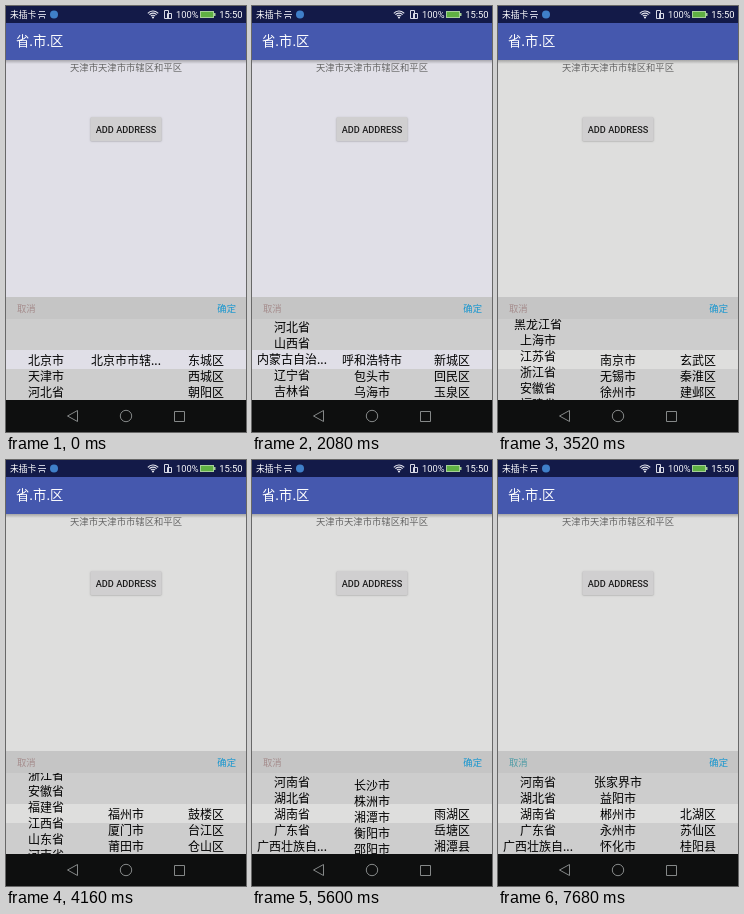
These frames come from a looping animation (240 px wide and 426 px high, 8.64 s). An HTML page with a canvas:

```html
<!DOCTYPE html>
<html lang="zh-CN">
<head>
<meta charset="utf-8">
<title>省市区</title>
<style>
html, body { margin: 0; width: 100%; height: 100%; overflow: hidden; background: #dedede; }
canvas { display: block; width: 240px; height: 426px; }
</style>
</head>
<body>
<canvas id="stage" width="240" height="426"></canvas>
<script>
const ctx = document.getElementById('stage').getContext('2d');
const LOOP = 8640, STEP = 160, ROW = 16.1, MID = 354.7;
const FONT = 'Roboto, "Noto Sans CJK SC", "Noto Sans CJK", sans-serif';

// province : cities : districts of the first city
const regions = `北京市:北京市市辖区:东城区 西城区 朝阳区
天津市:天津市市辖区:和平区 河东区 河西区
河北省:石家庄市 唐山市 秦皇岛市:长安区 桥西区 新华区
山西省:太原市 大同市 阳泉市:小店区 迎泽区 杏花岭区
内蒙古自治区:呼和浩特市 包头市 乌海市:新城区 回民区 玉泉区
辽宁省:沈阳市 大连市 鞍山市:和平区 沈河区 大东区
吉林省:长春市 吉林市 四平市:南关区 宽城区 朝阳区
黑龙江省:哈尔滨市 齐齐哈尔市 鸡西市:道里区 南岗区 道外区
上海市:上海市市辖区:黄浦区 徐汇区 长宁区
江苏省:南京市 无锡市 徐州市:玄武区 秦淮区 建邺区
浙江省:杭州市 宁波市 温州市:上城区 下城区 江干区
安徽省:合肥市 芜湖市 蚌埠市:瑶海区 庐阳区 蜀山区
福建省:福州市 厦门市 莆田市:鼓楼区 台江区 仓山区
江西省:南昌市 景德镇市 萍乡市:东湖区 西湖区 青云谱区
山东省:济南市 青岛市 淄博市:历下区 市中区 槐荫区
河南省:郑州市 开封市 洛阳市:中原区 二七区 管城回族区
湖北省:武汉市 黄石市 十堰市:江岸区 江汉区 硚口区
湖南省:长沙市 株洲市 湘潭市 衡阳市 邵阳市 岳阳市 常德市 张家界市 益阳市 郴州市 永州市 怀化市:芙蓉区 天心区 岳麓区
广东省:广州市 韶关市 深圳市:荔湾区 越秀区 海珠区
广西壮族自治区:南宁市 柳州市 桂林市:兴宁区 青秀区 江南区`
  .split('\n').map(line => line.split(':').map(part => part.split(' ')));
const provinces = regions.map(region => region[0][0]);

// districts of the later cities of 湖南省
const hunan = `荷塘区 芦淞区 石峰区:雨湖区 岳塘区 湘潭县:珠晖区 雁峰区 石鼓区:双清区 大祥区 北塔区:岳阳楼区 云溪区 君山区:武陵区 鼎城区 安乡县:永定区 武陵源区 慈利县:资阳区 赫山区 南县:北湖区 苏仙区 桂阳县`
  .split(':').map(part => part.split(' '));

// [time, wheel position in rows]
const provinceKeys = [[1440, 0], [1600, 2], [2240, 4.7], [2560, 5.9], [2720, 6.06], [2880, 6.06],
  [4160, 12.42], [4800, 16.2], [5120, 17]];
const cityKeys = [[5440, 0], [5600, 1.81], [6240, 4.5], [6560, 5], [6720, 5], [7360, 8.3], [7680, 9]];

function track(keys, t) {
  const next = keys.findIndex(key => key[0] > t);
  if (next === 0) return keys[0][1];
  if (next < 0) return keys[keys.length - 1][1];
  const [t0, a] = keys[next - 1], [t1, b] = keys[next];
  return a + (b - a) * (t - t0) / (t1 - t0);
}

function box(x, y, w, h, color) {
  ctx.fillStyle = color;
  ctx.fillRect(x, y, w, h);
}

// y is the middle of the glyphs
function label(text, x, y, size, color, align = 'left', weight = 400) {
  ctx.font = `${weight} ${size}px ${FONT}`;
  ctx.textAlign = align;
  ctx.fillStyle = color;
  ctx.fillText(text, x, y + size * 0.37);
}

function stroke(color, width, build) {
  ctx.strokeStyle = color;
  ctx.lineWidth = width;
  ctx.beginPath();
  build();
  ctx.stroke();
}

function disc(x, y, r, color) {
  ctx.fillStyle = color;
  ctx.beginPath();
  ctx.arc(x, y, r, 0, 7);
  ctx.fill();
}

function shade(y, h, alpha) {
  const fade = ctx.createLinearGradient(0, y, 0, y + h);
  fade.addColorStop(0, `rgba(0,0,0,${alpha})`);
  fade.addColorStop(1, 'rgba(0,0,0,0)');
  box(0, y, 240, h, fade);
}

function drawStatusBar() {
  box(0, 0, 240, 17, '#131a48');
  label('未插卡', 4, 9, 8.8, '#fff', 'left', 500);
  stroke('#c8cada', 1, () => {
    ctx.moveTo(33, 5.5); ctx.lineTo(39, 5.5);
    ctx.moveTo(32, 8.5); ctx.lineTo(40, 8.5);
    ctx.moveTo(33.5, 12.5); ctx.lineTo(33.5, 10.5); ctx.lineTo(38.5, 10.5); ctx.lineTo(38.5, 12.5);
  });
  disc(48, 8.5, 4, '#3f7fc8');
  stroke('#e4e5ee', 1.1, () => {
    for (const r of [2.8, 4.9, 7]) {
      ctx.moveTo(147 + r * Math.cos(-2.4), 12 + r * Math.sin(-2.4));
      ctx.arc(147, 12, r, -2.4, -0.74);
    }
  });
  disc(147, 11.5, 1.1, '#e4e5ee');
  stroke('#d8dae6', 1, () => {
    ctx.rect(158.5, 4.5, 4, 8);
    ctx.rect(161.5, 7.5, 4, 5);
  });
  label('100%', 170, 9, 9.3, '#f4f4f8');
  box(194, 5, 14, 7, '#a5cf98');
  box(195, 6, 12, 5, '#5fb043');
  box(208, 7, 1.5, 3, '#a5cf98');
  label('15:50', 236.5, 9, 9.4, '#fff', 'right');
}

function drawNavBar() {
  box(0, 394, 240, 32, '#0e0f0f');
  stroke('#858888', 1, () => {
    ctx.moveTo(61.5, 410); ctx.lineTo(71.5, 404.5); ctx.lineTo(71.5, 415.5); ctx.closePath();
    ctx.moveTo(125.7, 410); ctx.arc(120, 410, 5.7, 0, 7);
    ctx.rect(168.5, 405.5, 10, 10);
  });
}

function drawButton() {
  ctx.save();
  ctx.shadowColor = 'rgba(0,0,0,0.25)';
  ctx.shadowBlur = 1.5;
  ctx.shadowOffsetY = 0.5;
  ctx.fillStyle = '#d0cfd0';
  ctx.beginPath();
  ctx.roundRect(84.3, 111, 71.4, 24, 1.5);
  ctx.fill();
  ctx.restore();
  label('ADD ADDRESS', 120, 123.5, 9.2, '#1c1c1c', 'center', 500);
}

function drawWheel(names, position, x) {
  names.forEach((name, i) => {
    const y = Math.round(MID + (i - position) * ROW);
    if (y < 304 || y > 403) return;
    const text = name.length > 5 ? name.slice(0, 5) + '...' : name;
    label(text, x, y, 12, '#000', 'center', 500);
  });
}

function drawPicker(t, paper) {
  const province = track(provinceKeys, t), city = track(cityKeys, t);
  const [, cities, firstDistricts] = regions[Math.round(province)];
  const cityIndex = Math.round(city);
  const districts = cityIndex ? hunan[cityIndex - 1] : firstDistricts;

  box(0, 291, 240, 22, '#c5c5c5');
  label('取消', 11, 302.5, 9.33, t >= 7680 ? '#4f9ca6' : '#a58c8c');
  label('确定', 230, 302.5, 9.33, '#1a97cf', 'right');
  box(0, 313, 240, 81, '#cdcdcd');
  box(0, 344, 240, 19, paper);

  ctx.save();
  ctx.beginPath();
  ctx.rect(0, 313, 240, 81);
  ctx.clip();
  drawWheel(provinces, province, 40);
  drawWheel(cities, city, 120);
  drawWheel(districts, 0, 200);
  ctx.restore();
}

function draw(t) {
  const paper = t < 2160 ? '#e0dfe7' : '#dededd';
  box(0, 0, 240, 426, paper);
  box(0, 17, 240, 37, '#4558ae');
  shade(54, 4, 0.25);
  drawStatusBar();
  label('省.市.区', 10, 35.5, 13.33, '#fff', 'left', 500);
  label('天津市天津市市辖区和平区', 120, 61.3, 9.33, '#666', 'center');
  drawButton();
  drawPicker(t, paper);
  drawNavBar();
}

const start = performance.now();
function tick() {
  const t = (performance.now() - start) % LOOP;
  draw(Math.floor(t / STEP) * STEP);
  requestAnimationFrame(tick);
}
tick();
</script>
</body>
</html>
```
